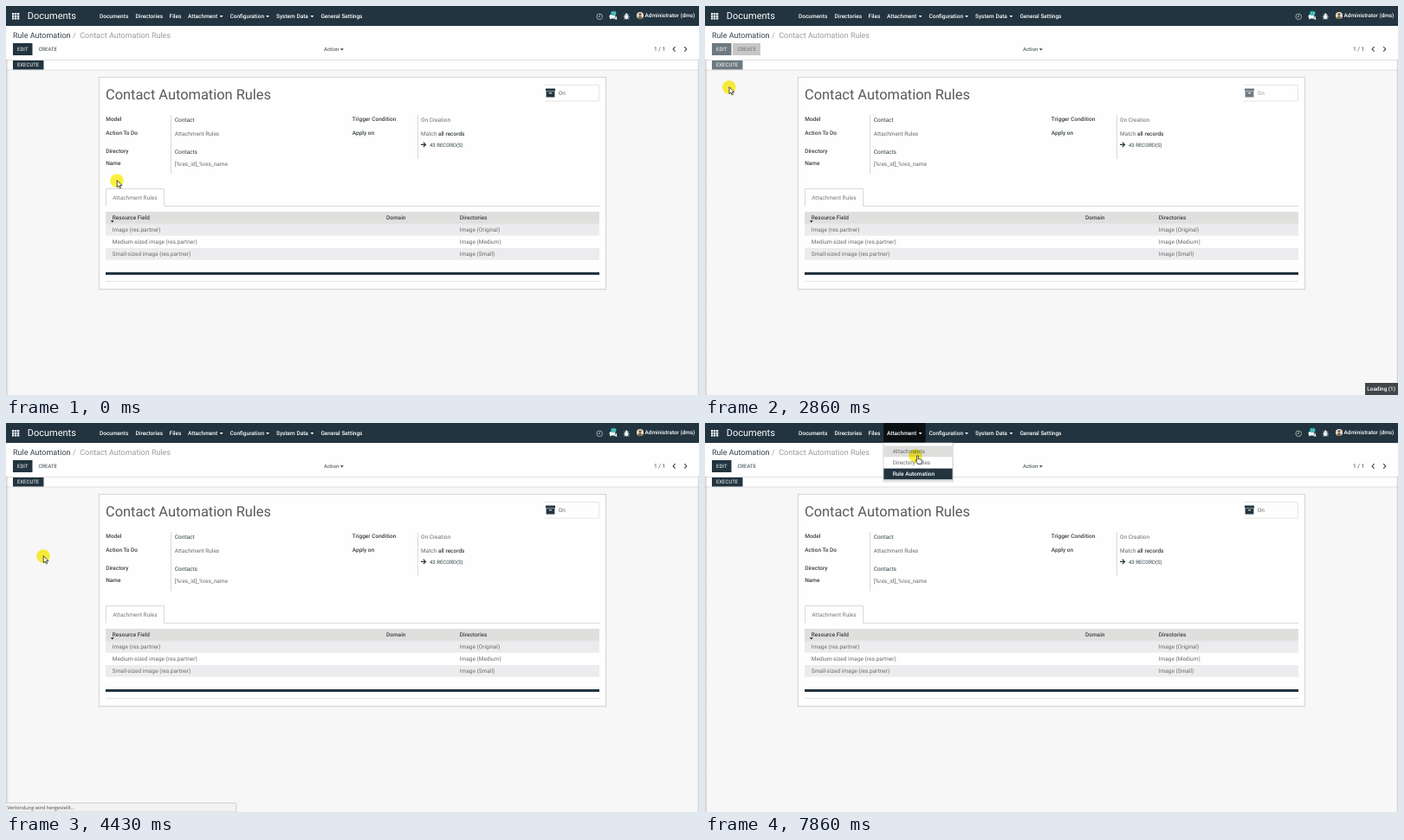
An HTML page for the animation above (8 s loop, 800x450 px).

```html
<!DOCTYPE html>
<html lang="en">
<head>
<meta charset="utf-8">
<title>Contact Automation Rules</title>
<style>
html, body { margin: 0; width: 100%; height: 100%; overflow: hidden; background: #f7f7f7; }
svg { display: block; width: 800px; height: 450px; }
text { font: 6.5px Roboto, sans-serif; fill: #6b6b6b; text-rendering: geometricPrecision; white-space: pre; }
.b { font-weight: 500; fill: #3c4247; }
.d { fill: #36414b; }
.w text, text.w { fill: #fff; }
.m text { font-weight: 500; }
.s { font-size: 6px; }
.h { font-size: 9px; }
.dark { fill: #22343f; }
.rule { stroke: #d9d9d9; fill: none; }
.off { opacity: .65; }
#status text { font: 5.7px "Open Sans", sans-serif; fill: #4a4a4a; }
#spot { mix-blend-mode: multiply; }
</style>
</head>
<body>
<svg viewBox="0 0 800 450">
  <defs>
    <linearGradient id="edge">
      <stop offset="0" stop-color="#888" stop-opacity=".4"/>
      <stop offset="1" stop-color="#888" stop-opacity="0"/>
    </linearGradient>
    <path id="caret" d="M0 0h4l-2 2.2z"/>
  </defs>

  <rect width="800" height="450" fill="#f7f7f7"/>
  <rect y="23" width="800" height="51" fill="#fdfefd"/>
  <path class="rule" d="M0 62.5H800M0 74H800" stroke-width=".8"/>
  <rect y="62" width="3" height="388" fill="url(#edge)"/>
  <rect y="62" width="2" height="388" fill="url(#edge)" transform="matrix(-1 0 0 1 800 0)"/>

  <!-- top bar -->
  <rect class="dark" width="800" height="23"/>
  <rect id="navOn" x="206" width="48.5" height="23" fill="#0b1013"/>
  <g id="apps" fill="#fff"></g>
  <text class="w" x="24.7" y="15.2" style="font-size:11px">Documents</text>
  <g class="w m">
    <text x="108" y="13.6">Documents</text>
    <text x="149.5" y="13.6">Directories</text>
    <text x="188.6" y="13.6">Files</text>
    <text x="210" y="13.6">Attachment</text>
    <text x="258.5" y="13.6">Configuration</text>
    <text x="312" y="13.6">System Data</text>
    <text x="363.4" y="13.6">General Settings</text>
    <text x="737.6" y="13.3" style="font-size:6.4px">Administrator (dms)</text>
  </g>
  <g fill="#fff">
    <use href="#caret" x="246.6" y="11"/>
    <use href="#caret" x="300" y="11"/>
    <use href="#caret" x="351.4" y="11"/>
  </g>
  <g fill="none" stroke="#a9b3b9" stroke-width=".9">
    <circle cx="685.2" cy="12.3" r="3.3"/>
    <path d="M685.3 10.2v2.3h-1.6"/>
  </g>
  <g fill="#f2f5f6">
    <ellipse cx="700" cy="12" rx="3.5" ry="2.6"/>
    <path d="M697.6 13l-.7 2.5 2.5-1.2zM701 14.6q3.2 0 3.2-3.2 1.4 1 .8 2.6l.4 2-2-.8q-1.7 0-2.4-.6z"/>
  </g>
  <rect x="698" y="5.8" width="6.6" height="5" rx="2.2" fill="#18a3a3"/>
  <text class="w" x="699.2" y="9.9" style="font-size:4.2px">12</text>
  <g stroke="#f2f5f6" stroke-width=".8" fill="#f2f5f6">
    <ellipse cx="716.3" cy="12.7" rx="1.7" ry="2.4"/>
    <path d="M712.8 12.7h7M713.5 9.8l5.6 5.8M719.1 9.8l-5.6 5.8" fill="none"/>
    <circle cx="716.3" cy="9.6" r=".9"/>
  </g>
  <circle cx="732" cy="11" r="4" fill="#e8e2d2"/>
  <path d="M729.2 13.9q.4-2.5 2.8-2.5t2.8 2.5q-2.8 2.2-5.6 0z" fill="#7d6645"/>
  <circle cx="732" cy="9.7" r="1.7" fill="#7d6645"/>

  <!-- control panel -->
  <text class="h d" x="8" y="37">Rule Automation</text>
  <text class="h" x="77" y="37" style="fill:#a5a5a5">/</text>
  <text class="h" x="85.2" y="37" style="fill:#9b9b9b">Contact Automation Rules</text>
  <g class="lock">
    <rect class="dark" x="8" y="43" width="22.5" height="14"/>
    <text class="s w" x="13" y="52.2">EDIT</text>
  </g>
  <rect id="createOff" x="32" y="43" width="32" height="14" fill="#c6c6c6"/>
  <g class="lock"><text class="s d" x="37.4" y="52.2">CREATE</text></g>
  <text class="s d" x="367" y="52.2">Action</text>
  <use href="#caret" x="385.8" y="49.2" fill="#36414b"/>
  <text x="748" y="52.3" class="d">1 / 1</text>
  <path d="M772.6 47.2l-2.5 2.7 2.5 2.7M783.2 47.2l2.5 2.7-2.5 2.7" fill="none" stroke="#3b464e" stroke-width="1.1"/>
  <g class="lock">
    <rect id="exec" class="dark" x="8" y="63" width="35.5" height="10.5"/>
    <text class="s w" x="12.9" y="70.3">EXECUTE</text>
  </g>

  <!-- sheet -->
  <rect x="106.5" y="82" width="587" height="247" fill="#000" opacity=".035"/>
  <rect x="107.5" y="82.5" width="585" height="245" fill="#fdfefd" stroke="#d6d6d6"/>
  <text x="115" y="108.2" style="font-size:16.4px;fill:#565a5e">Contact Automation Rules</text>
  <path class="rule" d="M622 91.5H684.5V110H622" style="stroke:#e6e6e6"/>
  <g class="lock">
    <path class="dark" d="M623 95.5h11v3h-11zM623.6 99h9.8v6.4h-9.8z"/>
    <path d="M626.8 100.8h3.4" stroke="#fff" stroke-width="1"/>
    <text x="637.8" y="102.7">On</text>
  </g>

  <path class="rule" d="M190.5 126V194.500M475.500 126V177"/>
  <g>
    <text class="b" x="115.2" y="133.2">Model</text>
    <text class="b" x="115.2" y="148.6">Action To Do</text>
    <text class="b" x="115.2" y="170.2">Directory</text>
    <text class="b" x="115.2" y="183.7">Name</text>
    <text class="d" x="194.8" y="134.2">Contact</text>
    <text x="194.8" y="149.6">Attachment Rules</text>
    <text class="d" x="194.8" y="171.2">Contacts</text>
    <text x="194.8" y="184.6">[%res_id]_%res_name</text>
    <text class="b" x="399.8" y="133.2">Trigger Condition</text>
    <text class="b" x="399.8" y="148.6">Apply on</text>
    <text x="479" y="134.2">On Creation</text>
    <text x="479" y="149.6">Match <tspan class="b">all records</tspan></text>
    <text class="s d" x="489" y="163">43 RECORD(S)</text>
  </g>
  <path d="M479 160.400h5M481.800 157.700l2.700 2.700-2.700 2.700" fill="none" stroke="#27343c" stroke-width="1.2"/>

  <path class="rule" d="M115.500 231.500V211.500H182.500V231.500H685"/>
  <text x="123.200" y="223.700" style="fill:#7a7a7a">Attachment Rules</text>

  <rect x="115" y="238" width="570" height="13.500" fill="#dfdfde"/>
  <rect x="115" y="252" width="570" height="13.700" fill="#ececee"/>
  <rect x="115" y="280" width="570" height="13.700" fill="#ececee"/>
  <path class="rule" d="M115 251.800H685" style="stroke:#d2d2d2" stroke-width=".6"/>
  <text class="b" x="122.800" y="247.200">Resource Field</text>
  <text class="b" x="439" y="247.200">Domain</text>
  <text class="b" x="523.800" y="247.200">Directories</text>
  <use href="#caret" x="120.800" y="248.200" fill="#222"/>
  <text x="122.800" y="261.200">Image (res.partner)</text>
  <text x="122.800" y="275.200">Medium-sized image (res.partner)</text>
  <text x="122.800" y="289.200">Small-sized image (res.partner)</text>
  <text x="523.800" y="261.200">Image (Original)</text>
  <text x="523.800" y="275.200">Image (Medium)</text>
  <text x="523.800" y="289.200">Image (Small)</text>
  <rect class="dark" x="115" y="308" width="570" height="3"/>
  <path class="rule" d="M115 318.500H685" style="stroke:#e3e3e3"/>

  <!-- overlays -->
  <g id="loading">
    <rect x="762" y="436" width="38" height="14" fill="#41464a"/>
    <text class="w" x="764.300" y="445.300" style="font-weight:500;font-size:6.400px">Loading (1)</text>
  </g>
  <g id="status">
    <path d="M0 439.500H264.500q1.500 0 1.500 1.500V450H0z" fill="#f2f2f2" stroke="#cfcfcf"/>
    <text x="1.500" y="447.200">Verbindung wird hergestellt...</text>
  </g>
  <g id="tip" class="w">
    <path d="M0 78H22l3.500-3 3.500 3H214.500V148.500H0z" fill="#020303" opacity=".97"/>
    <rect x="2" y="80" width="210" height="13.500" fill="#22333d"/>
    <text class="s" x="4.800" y="88.800" style="font-weight:500">Button : Execute</text>
    <text x="4.800" y="110.500" style="font-size:6.100px">Executes the action on all existing records to create the corresponding rules.</text>
    <g fill="none" stroke="#fff" stroke-width=".7">
      <circle cx="6.800" cy="121.800" r="1.200"/><circle cx="6.800" cy="130.300" r="1.200"/><circle cx="6.800" cy="138.800" r="1.200"/>
    </g>
    <text class="s" x="12.400" y="123.800"><tspan font-weight="700">Object:</tspan> base.automation</text>
    <text class="s" x="12.400" y="132.300"><tspan font-weight="700">Button Type:</tspan> object</text>
    <text class="s" x="12.400" y="140.800"><tspan font-weight="700">Method:</tspan> create_rules</text>
  </g>
  <g id="menu">
    <rect x="205.500" y="23" width="81.500" height="45.500" fill="#000" opacity=".1"/>
    <rect x="206" y="23" width="79.800" height="43.500" fill="#fdfefd" stroke="#cfcfcf" stroke-width=".6"/>
    <rect id="itemOn" x="206.300" y="26.500" width="79.300" height="12.700" fill="#dededd"/>
    <rect class="dark" x="206.300" y="52.600" width="79.300" height="12.700"/>
    <text x="216.700" y="35.300">Attachments</text>
    <text x="216.700" y="48.200">Directory Rules</text>
    <text class="w" x="216.700" y="61.200" style="font-weight:500">Rule Automation</text>
  </g>

  <circle id="spot" r="7.800" fill="#fdf23c"/>
  <g id="pointer" fill="#fff" stroke="#222" stroke-width=".8" stroke-linejoin="round">
    <path id="arrow" d="M.2-.4V7.700L2.100 6.100 3.400 8.900 4.700 8.300 3.400 5.600H6z"/>
    <path id="hand" d="M1.600.2q.9-.9 1.700 0V3.800q1-.6 1.500.2 1-.4 1.400.4 1.300-.2 1.300.9V7.200L6.500 9.400H2.800L.2 6q-.3-1.200.7-1l.7.600z"/>
  </g>
</svg>
<script>
const $ = id => document.getElementById(id);
const LOOP = 8000, TICK = 1000 / 7;

// pointer path: tick, x, y
const path = [
  [0, 128, 202], [1, 125, 202], [2, 119, 201], [4, 116, 201],
  [10, 116, 201], [11, 98, 184], [12, 56, 143], [13, 26.300, 115],
  [14, 24, 96], [15, 24, 81], [16, 24, 72], [18, 25, 68],
  [19, 25, 71], [20, 27.800, 94], [21, 33, 118], [22, 39, 139],
  [23, 42, 150], [25, 43, 154], [40, 43, 154],
  [41, 50, 149], [42, 82, 128], [43, 130, 99], [44, 185, 70],
  [45, 228, 50], [46, 245, 42], [47, 249, 27], [48, 245, 16],
  [53, 245, 16], [54, 245, 27], [55, 243, 38]
];

function at(keys, n) {
  const i = keys.findIndex(k => k[0] >= n);
  if (i < 1) return keys[i < 0 ? keys.length - 1 : 0].slice(1);
  const a = keys[i - 1], b = keys[i], f = (n - a[0]) / (b[0] - a[0]);
  return a.slice(1).map((v, j) => v + (b[j + 1] - v) * f);
}

const show = (id, on) => { $(id).style.opacity = +on; };

for (let i = 0; i < 9; i++) {
  const box = document.createElementNS("http://www.w3.org/2000/svg", "rect");
  const place = { x: 7 + i % 3 * 3, y: 8 + Math.floor(i / 3) * 2.700, width: 2.300, height: 2.100 };
  for (const k in place) box.setAttribute(k, place[k]);
  $("apps").append(box);
}

function draw(now) {
  const n = Math.floor((now % LOOP + 4) / TICK) % 56;
  const within = (a, b) => n >= a && n < b;
  const [x, y] = at(path, n);
  const move = `translate(${x} ${y})`;
  $("spot").setAttribute("transform", move);
  $("pointer").setAttribute("transform", move);

  const hand = within(16, 20) && y < 74 || n >= 48;
  show("hand", hand);
  show("arrow", !hand);

  const busy = within(19, 26);
  document.querySelectorAll(".lock").forEach(g => g.classList.toggle("off", busy));
  show("createOff", busy);
  $("exec").style.fill = within(16, 19) ? "#131e25" : "";
  show("loading", n < 19 ? 0 : at([[24, 1], [25, .800], [26, .450], [27, .150], [29, 0]], n)[0]);
  show("tip", within(27, 31));
  show("status", within(31, 34));
  show("navOn", n >= 48);
  show("menu", n >= 49);
  show("itemOn", n >= 55);
  requestAnimationFrame(draw);
}
draw(performance.now());
</script>
</body>
</html>
```
